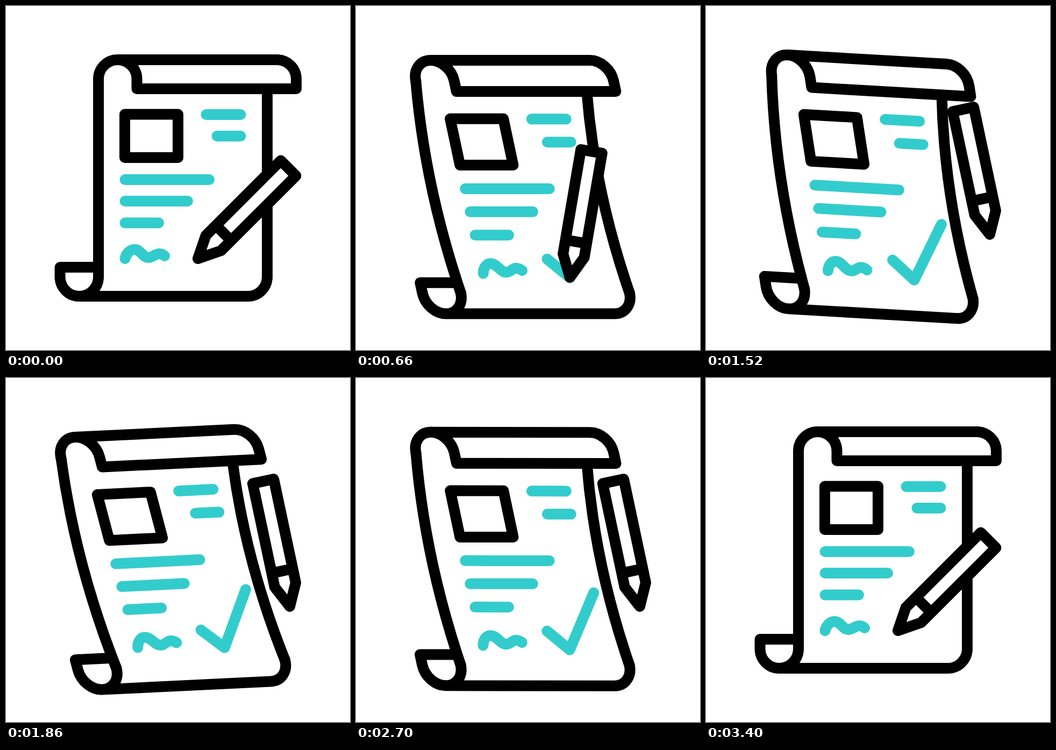
Recreate the animation shown at these times as an HTML page. Size 640x640 px, loop 3.6 s.

```html
<!DOCTYPE html>
<html lang="en">
<head>
<meta charset="utf-8">
<title>Signing a scroll</title>
<style>
  html, body { margin: 0; width: 100%; height: 100%; overflow: hidden; background: #fff; }
  svg { display: block; width: 100%; height: 100%; }
  path { fill: none; stroke: #000; stroke-width: 20; stroke-linecap: round; stroke-linejoin: round; vector-effect: non-scaling-stroke; }
  .ink { stroke: #33cccc; }
  #pen path { fill: #fff; }
</style>
</head>
<body>
<svg viewBox="0 0 640 640">
  <g id="sheet">
    <path class="ink" d="M372.5 202H436.5M392.5 242H436.5M221.5 323H378M221.5 363H338M221.5 403.5H284"/>
    <path class="ink" d="M221.5 470C224 460 231 453 239 453C251 453 254 468 265 468C273 468 279 460 286 461Q291 461.5 295 465"/>
    <path class="ink" id="check"/>
    <path d="M221 201.5H320V282H221Z"/>
    <path d="M172 136A35.75 36 0 0 1 243.5 136V154H540V136A36 36 0 0 0 504 100H208"/>
    <path d="M167 486H100.5V504A35.75 36 0 0 0 172 504M136 540H450A36 36 0 0 0 486 504"/>
    <path id="sides"/>
  </g>
  <g id="pen">
    <path d="M0 0L-20 -41V-238H20V-41ZM-20 -67.5H20"/>
  </g>
</svg>
<script>
  const LOOP = 3600;
  const el = id => document.getElementById(id);
  const sheet = el('sheet'), sides = el('sides'), check = el('check'), pen = el('pen');

  const mix = (a, b, k) => a + (b - a) * k;
  const smooth = k => k * k * (3 - 2 * k);

  // Eased value of a list of [time, ...values] keys
  function track(keys, t) {
    const i = keys.findIndex(key => key[0] > t);
    if (i < 0) return keys[keys.length - 1].slice(1);
    if (i === 0) return keys[0].slice(1);
    const [a, b] = [keys[i - 1], keys[i]];
    const k = smooth((t - a[0]) / (b[0] - a[0]));
    return a.slice(1).map((v, n) => mix(v, b[n + 1], k));
  }

  const bendKeys = [[0, 0], [400, 1], [3000, 1], [3400, 0]];
  const fadeKeys = [[3000, 1], [3400, 0]];
  const drawKeys = [[400, 0], [660, 1], [1000, 2]];

  // Rocking: seven swings of 5 degrees, 200 ms apart
  const rockKeys = [[1400, 0]];
  for (let i = 0; i < 7; i++) rockKeys.push([1600 + i * 200, i % 2 ? -5 : 5]);
  rockKeys.push([3000, 0]);

  // Tip x, tip y, tilt
  const penKeys = [
    [0, 357, 470, 45],
    [400, 352, 472.3, 9.7],
    [660, 398, 505, 9.7],
    [1000, 442.5, 399, 9.7],
    [1400, 528, 425, -12],
    [3000, 528, 425, -12],
    [3400, 357, 470, 45]
  ];

  const corners = [[346, 445], [381, 477.6], [448, 378.5]];

  function checkPath(p) {
    if (p <= 0) return '';
    const i = Math.min(1, Math.floor(p));
    const end = corners[i].map((v, n) => mix(v, corners[i + 1][n], p - i));
    return 'M' + [...corners.slice(0, i + 1), end].join('L');
  }

  function draw(t) {
    const [bend] = track(bendKeys, t);
    const [rock] = track(rockKeys, t);
    const [x, y, tilt] = track(penKeys, t);
    const skew = 0.2275 * bend, grow = 1 + 0.0715 * bend, bow = 25 * bend;

    sheet.setAttribute('transform',
      `rotate(${rock} 320 324) matrix(1 0 ${skew} ${grow} ${-403 * skew} ${-6.1 * bend})`);
    sides.setAttribute('d',
      `M172 136Q${172 - bow} 320 172 504M486 154Q${486 - bow} 329 486 504`);
    check.setAttribute('d', checkPath(track(drawKeys, t)[0]));
    check.setAttribute('opacity', track(fadeKeys, t)[0]);
    pen.setAttribute('transform', `translate(${x} ${y}) rotate(${tilt})`);
  }

  function frame() {
    draw(performance.now() % LOOP);
    requestAnimationFrame(frame);
  }
  frame();
</script>
</body>
</html>
```
